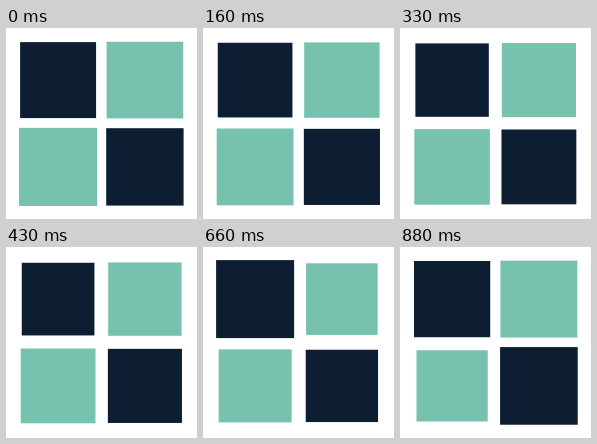
Animation, 191 px wide and 191 px high, one loop 0.92 s. Source, as an HTML page:

```html
<!DOCTYPE html>
<html lang="en">
<head>
<meta charset="utf-8">
<title>Loading squares</title>
<style>
  html, body { margin: 0; width: 100%; height: 100%; overflow: hidden; background: #fff; }
  svg { display: block; width: 100%; height: 100%; }
</style>
</head>
<body>
<svg viewBox="0 0 191 191"></svg>
<script>
  const LOOP = 920, STEPS = 28;
  const CENTER = 95.5, OFFSET = 43.4;
  const MAX = 78.1, MIN = 71;
  const NAVY = '#0d1e33', TEAL = '#77c2af';

  const svg = document.querySelector('svg');

  // Clockwise from top left; each square snaps open a tenth of a loop after the last.
  const squares = [
    [-1, -1, NAVY, 0.3],
    [1, -1, TEAL, 0.2],
    [1, 1, NAVY, 0.1],
    [-1, 1, TEAL, 0],
  ].map(([sx, sy, color, lead]) => {
    const rect = document.createElementNS('http://www.w3.org/2000/svg', 'rect');
    rect.setAttribute('fill', color);
    svg.append(rect);
    return { rect, lead, cx: CENTER + sx * OFFSET, cy: CENTER + sy * OFFSET };
  });

  function draw(time) {
    const step = Math.min(STEPS - 1, Math.floor(time % LOOP / LOOP * STEPS + 0.25));
    for (const { rect, lead, cx, cy } of squares) {
      const phase = (step / STEPS + lead) % 1;
      const size = MAX + (MIN - MAX) * phase;
      rect.setAttribute('x', cx - size / 2);
      rect.setAttribute('y', cy - size / 2);
      rect.setAttribute('width', size);
      rect.setAttribute('height', size);
    }
  }

  const start = performance.now();
  function tick() {
    draw(performance.now() - start);
    requestAnimationFrame(tick);
  }
  tick();
</script>
</body>
</html>
```
